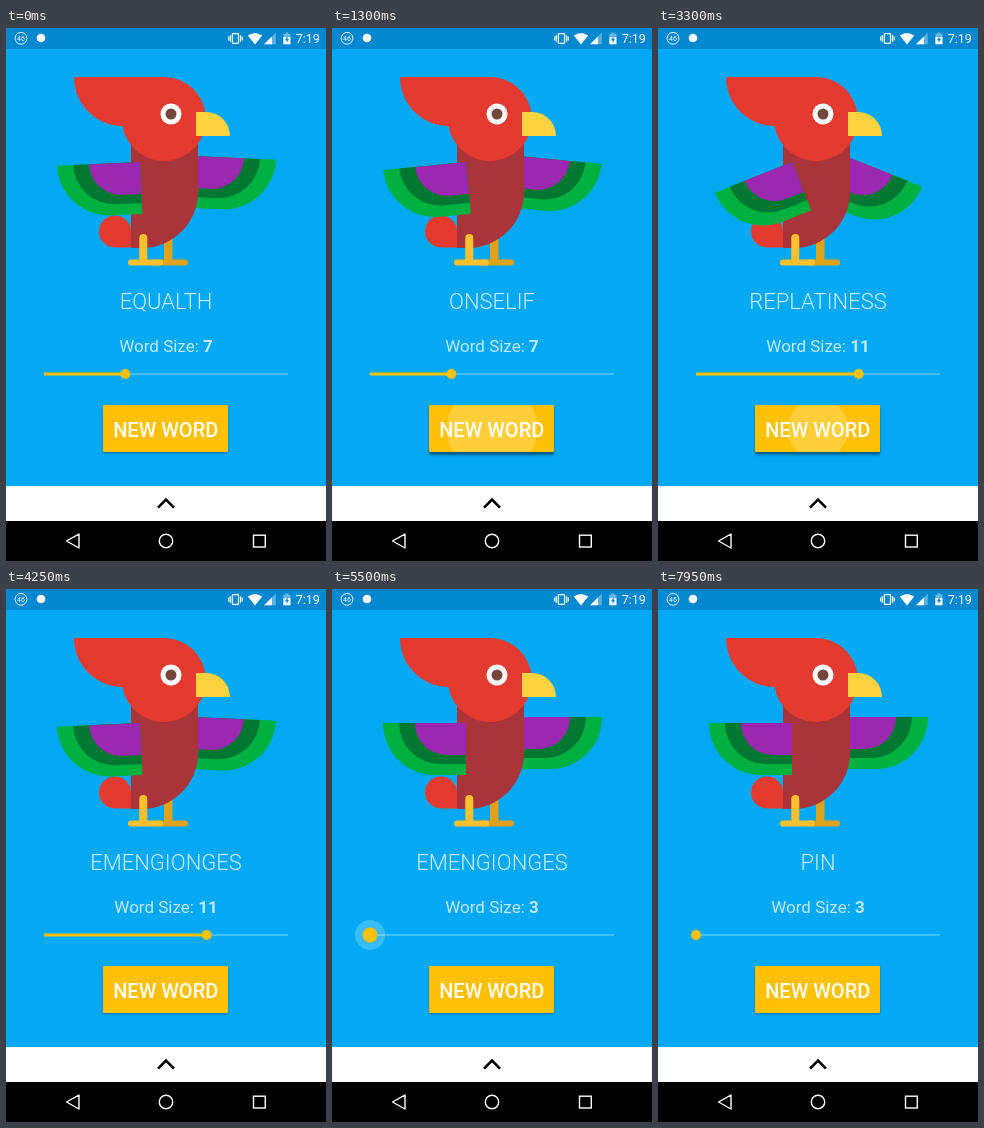
These frames come from a looping animation (320x533 px, 8 s). An HTML page:

```html
<!DOCTYPE html>
<html lang="en">
<head>
<meta charset="utf-8">
<title>Word generator</title>
<style>
html, body { margin: 0; width: 100%; height: 100%; overflow: hidden; background: #03a9f4; }
svg { display: block; width: 100%; height: 100%; }
text { font-family: Roboto, "Noto Sans", sans-serif; fill: #fff; text-anchor: middle; }
</style>
</head>
<body>
<svg viewBox="0 0 320 533">
  <defs>
    <g id="wing">
      <path fill="#00b140" d="M0 0H-83A52 52 0 0 0 -31 52H0Z"/>
      <path fill="#007832" d="M0 0H-67A41 41 0 0 0 -26 41H0Z"/>
      <path fill="#9c27b0" d="M0 0H-51A32 32 0 0 0 -19 32H0Z"/>
    </g>
    <clipPath id="face"><rect x="97" y="377" width="125" height="47" rx="1"/></clipPath>
    <filter id="blur" x="-20%" y="-40%" width="140%" height="180%"><feGaussianBlur stdDeviation="1.2"/></filter>
  </defs>

  <rect width="320" height="533" fill="#03a9f4"/>

  <!-- status bar -->
  <rect width="320" height="21" fill="#0288d1"/>
  <circle cx="15" cy="10.3" r="5.9" fill="none" stroke="#fff" stroke-width=".9"/>
  <text x="15" y="12.9" font-size="7">46</text>
  <circle cx="35" cy="10" r="4.3" fill="#fff"/>
  <g fill="none" stroke="#fff" stroke-width="1.2">
    <rect x="226.3" y="5.6" width="6.2" height="9.8" rx=".8"/>
    <path d="M224.3 7.2V13.8M222.6 8.6V12.4M234.5 7.2V13.8M236.2 8.6V12.4"/>
  </g>
  <path fill="#fff" d="M241.8 7.6Q249 2.3 256.2 7.6L249 16.4Z"/>
  <path fill="#fff" fill-opacity=".35" d="M258 16.2L269.8 4.6V16.2Z"/>
  <path fill="#fff" d="M258 16.2L266 8.4V16.2Z"/>
  <path fill="#fff" fill-opacity=".4" d="M277.4 5.8H279.4V4.6H282.4V5.8H284.4V16.2H277.4Z"/>
  <path fill="#fff" d="M277.4 9H284.4V16.2H277.4Z"/>
  <path fill="#0288d1" d="M281.6 8L278.9 12.2H280.6V15L283 10.9H281.6Z"/>
  <text x="301.7" y="15" font-size="12.5">7:19</text>

  <!-- bird -->
  <use id="rightWing" href="#wing"/>
  <path fill="#e0a11b" d="M158 200H166.5V231.5H179A3 3 0 0 1 179 237.5H150A3 3 0 0 1 150 231.5H158Z"/>
  <path fill="#e53a30" d="M125 219.5H109A16 16 0 1 1 125 203Z"/>
  <path fill="#a93439" d="M125 90H192V164A56 56 0 0 1 136 220H125Z"/>
  <path fill="#e53a30" d="M68 49H158A42 42 0 1 1 116.5 98A49 49 0 0 1 68 49Z"/>
  <path fill="#fdd23f" d="M190 84H200A24 24 0 0 1 224 108H190Z"/>
  <circle cx="165" cy="86" r="10.5" fill="#fff"/>
  <circle cx="165" cy="86" r="5.5" fill="#74473c"/>
  <path fill="#fbc02d" d="M133.3 210A4 4 0 0 1 141.3 210V231.5H154A3 3 0 0 1 154 237.5H125A3 3 0 0 1 125 231.5H133.3Z"/>
  <use id="leftWing" href="#wing"/>

  <!-- word and slider -->
  <text id="word" x="160" y="281" font-size="22" font-weight="300" fill-opacity=".8"></text>
  <text x="160" y="323.6" font-size="17" fill-opacity=".75">Word Size: <tspan id="size" font-weight="700"></tspan></text>
  <path d="M38 346H282" stroke="#fff" stroke-opacity=".5"/>
  <path id="filled" stroke="#ffc107" stroke-width="3"/>
  <circle id="halo" cy="346" fill="#fff"/>
  <circle id="thumb" cy="346" fill="#ffc107"/>

  <!-- button -->
  <rect id="shadow" x="97" width="125" height="47" rx="1" filter="url(#blur)"/>
  <rect x="97" y="377" width="125" height="47" rx="1" fill="#ffc107"/>
  <g clip-path="url(#face)"><circle id="ripple" cx="160" cy="401" fill="#fff"/></g>
  <text x="159.7" y="408.7" font-size="20" font-weight="500">NEW WORD</text>

  <!-- bottom panel and navigation -->
  <rect y="458" width="320" height="35" fill="#fff"/>
  <path d="M152 479.6L160 471.6L168 479.6" fill="none" stroke="#000" stroke-width="2.6"/>
  <rect y="493" width="320" height="40"/>
  <g fill="none" stroke="#fff" stroke-width="1.4">
    <path d="M73 506V520L60.5 513Z" stroke-linejoin="round"/>
    <circle cx="160" cy="513" r="6.7"/>
    <rect x="247.5" y="507.2" width="11.8" height="11.8"/>
  </g>
</svg>
<script>
const LOOP = 8000, SWING = 26;

// The wings pause at the end of a flap and settle later.
const taps = [
  { at: 0, end: 350, settle: 500, from: .1, to: .73, word: "EQUALTH" },
  { at: 1150, end: 1550, settle: 2150, from: .1, to: .9, word: "ONSELIF" },
  { at: 3200, end: 3600, settle: 4250, from: .1, to: .9, word: "REPLATINESS" },
  { at: 4250, end: 4650, settle: 5150, from: .1, to: .9, word: "EMENGIONGES" },
  { at: 6250, end: 6650, settle: 6650, from: .1, to: 1, word: "PLY" },
  { at: 7000, end: 7500, settle: 7950, from: .02, to: .9, word: "PIN" }
];
const drags = [
  { at: 2150, end: 2900, from: 8, to: 11, step: 130 },
  { at: 5150, end: 5950, from: 10, to: 3, step: 45 }
];

const $ = id => document.getElementById(id);
const clamp = x => Math.max(0, Math.min(1, x));
const set = (id, attrs) => {
  for (const key in attrs) $(id).setAttribute(key, attrs[key]);
};
const write = (id, text) => {
  if ($(id).textContent !== String(text)) $(id).textContent = text;
};
const latest = (list, t) => list.filter(e => e.at <= t).pop();

// Down, up, down and back to level, eased over the whole flap.
function wingAngle(tap, t) {
  if (t >= tap.settle) return 0;
  const k = clamp((t - tap.at) / (tap.end - tap.at));
  const p = tap.from + (tap.to - tap.from) * k;
  const u = 4 * (.5 - .5 * Math.cos(Math.PI * p));
  const points = [0, 1, -1, 1, 0];
  const i = Math.min(3, Math.floor(u));
  return SWING * (points[i] + (points[i + 1] - points[i]) * (u - i));
}

function drawSlider(t) {
  const drag = latest(drags, t);
  let size = 7, press = 0, grow = 0, fade = 0;
  if (drag) {
    const steps = Math.floor((t - drag.at) / drag.step);
    const span = Math.abs(drag.to - drag.from);
    size = drag.from + Math.sign(drag.to - drag.from) * Math.min(steps, span);
    const release = clamp((drag.end - t) / 200);
    press = Math.min(clamp((t - drag.at + 60) / 100), release);
    grow = clamp((t - drag.at) / 250);
    fade = release;
  }
  const x = 38 + (size - 3) * 244 / 12;
  write("size", size);
  set("filled", { d: `M38 346H${x}` });
  set("thumb", { cx: x, r: 5 + 2.5 * press });
  set("halo", { cx: x, r: 15 * grow, "fill-opacity": .22 * fade });
}

function drawButton(age) {
  const lift = Math.min(clamp(age / 120), clamp((400 - age) / 180));
  set("shadow", { y: 378 + 2 * lift, "fill-opacity": .35 + .1 * lift });
  set("ripple", {
    r: 75 * clamp(age / 250),
    "fill-opacity": .2 * clamp((400 - age) / 250)
  });
}

function draw(t) {
  const tap = latest(taps, t);
  const angle = wingAngle(tap, t);
  set("leftWing", { transform: `translate(134 134) rotate(${-angle})` });
  set("rightWing", { transform: `translate(187 128) rotate(${angle}) scale(-1 1)` });
  write("word", tap.word);
  drawSlider(t);
  drawButton(t - tap.at);
}

function tick() {
  draw(performance.now() % LOOP);
  requestAnimationFrame(tick);
}
tick();
</script>
</body>
</html>
```
